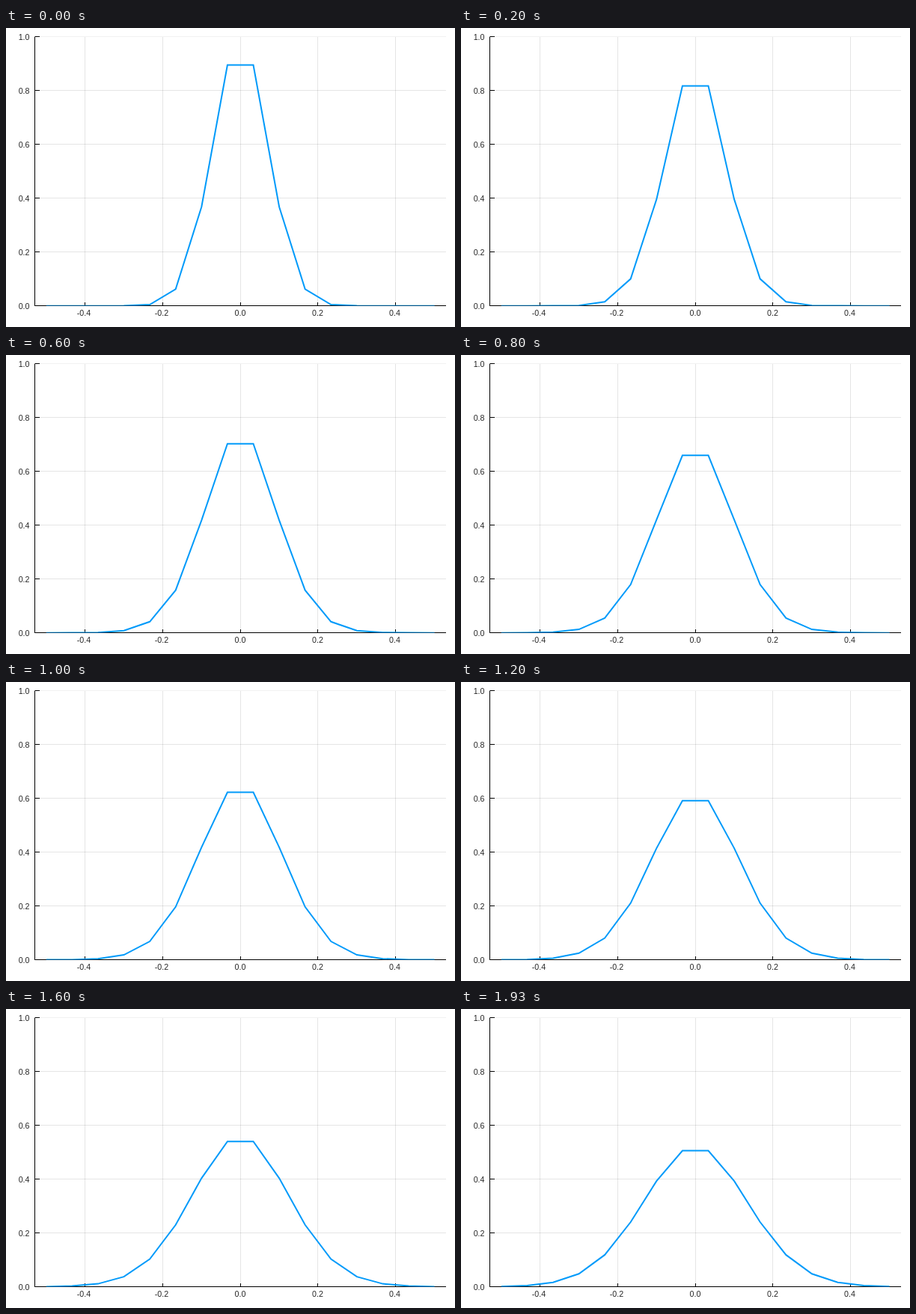
Recreate the animation shown at these times as an HTML page. Size 600 by 400 pixels, loop 1.99 s.

```html
<!DOCTYPE html>
<html lang="en">
<head>
<meta charset="utf-8">
<title>Diffusion of a Gaussian</title>
<style>
html, body { margin: 0; width: 100%; height: 100%; overflow: hidden; background: #fff; }
svg { display: block; }
text { font: 10.67px "Liberation Sans", Arial, sans-serif; fill: #262626; }
</style>
</head>
<body>
<svg width="600" height="400" viewBox="0 0 600 400">
  <clipPath id="plot"><rect x="38" y="11" width="550" height="360.4"/></clipPath>
  <g id="axes"></g>
  <polyline id="curve" clip-path="url(#plot)" fill="none" stroke="#009afa" stroke-width="2"/>
</svg>
<script>
const POINTS = 16, FRAMES = 30, LOOP = 1990;
const RATE = 0.0551;   // diffusion number per frame
const SUBSTEPS = 100;

const px = x => 313.2 + 518.9 * x;
const py = y => 371.65 - 360 * y;
const crisp = v => Math.floor(v) + 0.5;

const axes = document.getElementById('axes');
const curve = document.getElementById('curve');

function add(tag, attrs, label = '') {
  const el = document.createElementNS('http://www.w3.org/2000/svg', tag);
  for (const key in attrs) el.setAttribute(key, attrs[key]);
  el.textContent = label;
  axes.append(el);
}

function line(x1, y1, x2, y2, opacity = 1) {
  add('line', { x1, y1, x2, y2, stroke: '#000', 'stroke-opacity': opacity });
}

function drawAxes() {
  const labelX = [104, 208, 313, 416.5, 519.5];
  labelX.forEach((at, i) => {
    const value = (i - 2) / 5, x = crisp(px(value));
    line(x, 12, x, 371, 0.1);
    line(x, 367, x, 371);
    add('text', { x: at, y: 385, 'text-anchor': 'middle' }, value.toFixed(1));
  });
  for (let i = 0; i <= 5; i++) {
    const y = crisp(py(i / 5));
    line(39, y, 588, y, i < 5 ? 0.1 : 0.05);
    line(39, y, 45, y);
    add('text', { x: 31.5, y: y + 4.3, 'text-anchor': 'end' }, (i / 5).toFixed(1));
  }
  line(38.5, 11.5, 38.5, 372);
  line(38, 371.5, 588, 371.5);
}

// Heat equation on a grid, with zero outside both ends.
function diffuse(u) {
  const k = RATE / SUBSTEPS;
  for (let s = 0; s < SUBSTEPS; s++)
    u = u.map((v, i) => v + k * ((u[i - 1] || 0) - 2 * v + (u[i + 1] || 0)));
  return u;
}

const xs = Array.from({ length: POINTS }, (_, i) => i / (POINTS - 1) - 0.5);
const states = [xs.map(x => Math.exp(-100 * x * x))];
while (states.length < FRAMES) states.push(diffuse(states[states.length - 1]));

function draw() {
  // Fifteen frames a second, with starts rounded to 10 ms.
  const ticks = Math.floor(performance.now() % LOOP / 10);
  const u = states[Math.floor((ticks * 3 + 1) / 20)];
  curve.setAttribute('points', xs.map((x, i) => `${px(x)},${py(u[i])}`).join(' '));
  requestAnimationFrame(draw);
}

drawAxes();
draw();
</script>
</body>
</html>
```
